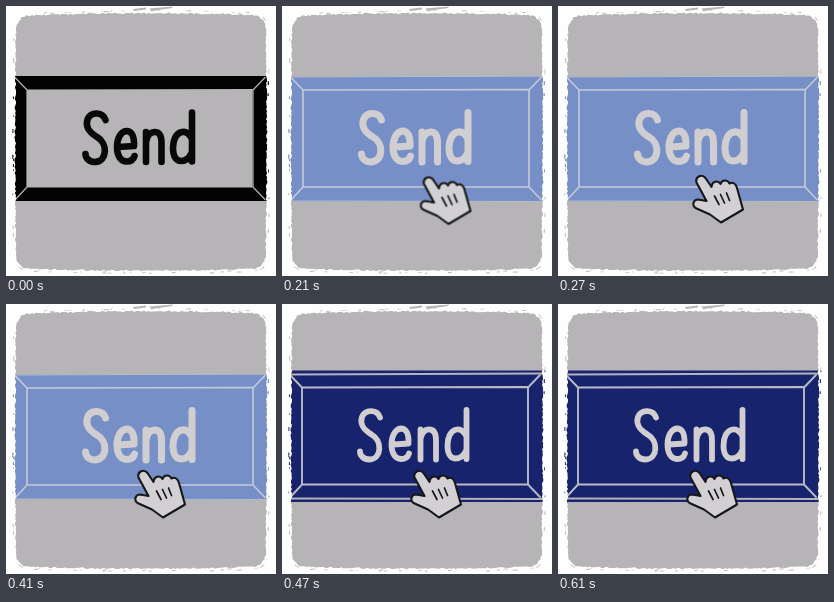
Write an HTML page that moves like this. It is 270x270 px and loops after 730 ms.

```html
<!DOCTYPE html>
<html lang="en">
<head>
<meta charset="utf-8">
<title>Send button</title>
<style>
  html, body { margin: 0; width: 100%; height: 100%; overflow: hidden; background: #fefefe; }
  svg { display: block; width: 100vw; height: 100vh; }
  path { fill: none; stroke-linecap: round; stroke-linejoin: round; }
  .look { opacity: 0; }
</style>
</head>
<body>
<svg viewBox="0 0 270 270" role="img" aria-label="Send">
  <defs>
    <clipPath id="torn"><path id="edge"/></clipPath>
    <filter id="soft" filterUnits="userSpaceOnUse" x="-10" y="0" width="290" height="270" color-interpolation-filters="sRGB">
      <feGaussianBlur stdDeviation=".55"/>
    </filter>
    <path id="word" d="M99.500 114C97 106 85 105 81.500 113.500C79 121 83 126 91 131C102 137 101.500 155.500 89 156C83 156 79.500 152 79.500 148
      M112.500 141L128 140C128.500 129 125 125 120.500 125C114.500 125.500 111 133 111 141C111 150 115 155.500 120.500 155.500C124.500 155.500 127.500 153.500 128.500 150
      M140 126V156M140 136C141.500 128 145.500 125.500 149.500 126C154.500 126.500 155.500 131 155.500 137V156
      M186 106.500V155.500M186 133C183 127 179 125.500 176 126C170 127 167 134 167 142C167 150 170 155 175 155C180 155 184 151 186 146"/>
    <path id="bevel" d="M21 84L247 83.500V181H21ZM9 71.500L21 84M259 71.500L247 84M9 194L21 181M259 193.500L247 181"/>
    <path id="rails" d="M8 71L262 70M8 195L262 195.500"/>
  </defs>

  <g clip-path="url(#torn)">
    <rect width="270" height="270" fill="#b6b4b6"/>
    <g class="look" id="idle" filter="url(#soft)">
      <rect x="-5" y="70" width="280" height="125" fill="#030303"/>
      <rect x="21" y="84" width="225.500" height="97" fill="#b6b4b6"/>
      <use href="#bevel" stroke="#b6b4b6" stroke-width="1.200"/>
      <use href="#word" stroke="#080808" stroke-width="6.600"/>
    </g>
    <g class="look" id="hover" filter="url(#soft)">
      <rect x="-5" y="70.500" width="280" height="125" fill="#7690c7"/>
      <use href="#rails" stroke="#b6bbcb" stroke-width="1"/>
      <use href="#bevel" stroke="#c6cad8" stroke-width="1.600"/>
      <use href="#word" stroke="#d0ced0" stroke-width="7"/>
    </g>
    <g class="look" id="down" filter="url(#soft)">
      <rect x="-5" y="66.500" width="280" height="131.500" fill="#18236e"/>
      <use href="#rails" y="-.5" stroke="#b2b3bd" stroke-width="2"/>
      <use href="#bevel" x="-1" y="-.5" stroke="#b9bac6" stroke-width="1.900"/>
      <use href="#word" x="-1.500" y="-.5" stroke="#d0ced0" stroke-width="5.800"/>
    </g>
  </g>

  <g class="look" id="hand">
    <g filter="url(#soft)">
      <path style="fill:#d2d0d2" stroke="#171719" stroke-width="2.100"
        d="M155.500 198L145.500 179.500C144 173.500 151 170.500 154.500 175L160.500 184
        C161 178 167 177 169.500 181C171 176.500 176.500 176.500 178.500 180.500C182 178.500 185 181 186 185
        L192 206.500L170 219.500L159 211.500L144.500 205C140.500 202 142.500 196.500 147 196.500Z"/>
      <path stroke="#171719" stroke-width="1.700" d="M163.500 193L168 201.500M169.500 191.500L173.500 200M175.500 190L178.500 197.500"/>
    </g>
  </g>
</svg>

<script>
const LOOP = 730;
const $ = id => document.getElementById(id);

let seed = 17;
const rnd = () => (seed = seed * 16807 % 2147483647) / 2147483647;

// Worn border: a bowed rounded square, jittered along its normal, plus loose flecks.
function tear(path) {
  path.setAttribute('d', 'M24 9.5Q135 5 246 9Q258 10 259.500 22Q262 135 259.500 249Q259 262 246 263' +
    'Q135 266 24 263Q10 262 10 249Q8.500 135 10 24Q11 10 24 9.5Z');
  const len = path.getTotalLength();
  const at = (s, out) => {
    const p = path.getPointAtLength((s + len) % len);
    const q = path.getPointAtLength((s + 0.5 + len) % len);
    const dx = q.x - p.x, dy = q.y - p.y, k = out / (Math.hypot(dx, dy) || 1);
    return (p.x + dy * k).toFixed(1) + ' ' + (p.y - dx * k).toFixed(1);
  };
  const rim = [], flecks = [];
  for (let s = 0; s < len; s += 2) {
    rim.push(at(s, (rnd() - 0.5) * 1.5));
    if (rnd() < 0.13) {
      const out = 1 + rnd() * 1.5, w = 1 + rnd() * 4, h = 0.4 + rnd() * 0.7;
      flecks.push([at(s, out), at(s, out + h), at(s + w, out + h), at(s + w, out)]);
    }
  }
  const streaks = 'M127 3L140 1.500L140 3.500L128 5ZM143 2.500L167 .5L166 2L146 5Z';
  path.setAttribute('d', [rim, ...flecks].map(p => 'M' + p.join('L') + 'Z').join('') + streaks);
}

// Each step is [start in ms, value]; values hold until the next step.
function hold(el, prop, steps) {
  const frames = steps.map(([t, v]) => ({ offset: t / LOOP, [prop]: v, easing: 'step-end' }));
  frames.push({ offset: 1, [prop]: steps[steps.length - 1][1] });
  el.animate(frames, { duration: LOOP, iterations: Infinity }).startTime = document.timeline.currentTime;
}

tear($('edge'));
hold($('idle'), 'opacity', [[0, 1], [70, 0]]);
hold($('hover'), 'opacity', [[0, 0], [70, 1], [470, 0]]);
hold($('down'), 'opacity', [[0, 0], [470, 1]]);
hold($('hand'), 'opacity', [[0, 0], [70, 1]]);
hold($('hand'), 'transform', [[0, 0, 0], [210, -3.5, -1.5], [270, -7, -3], [340, -10, -4.5], [410, -13, -6]]
  .map(([t, x, y]) => [t, `translate(${x}px, ${y}px)`]));
</script>
</body>
</html>
```
